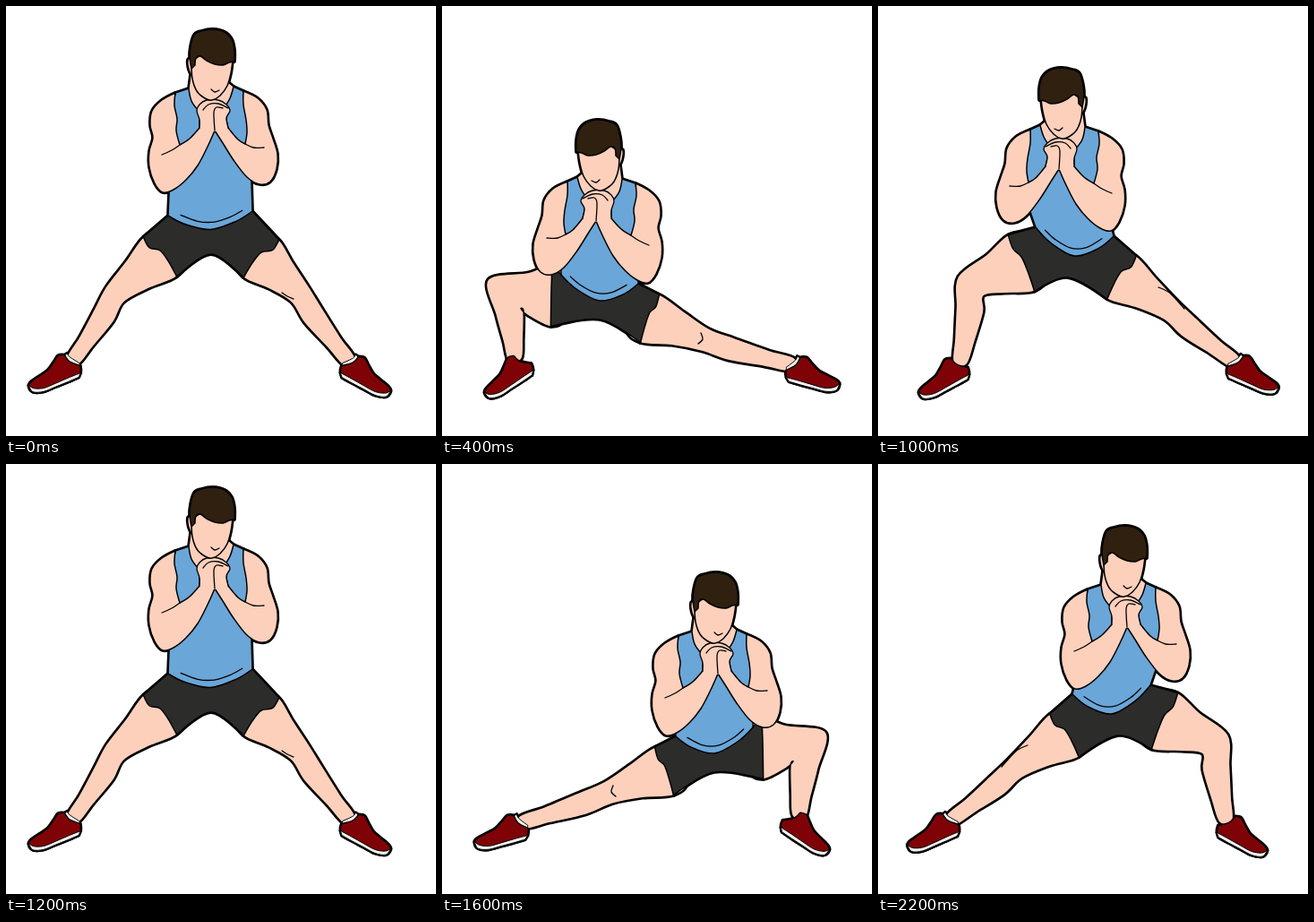
These frames come from a looping animation (480x480 px, 2.4 s). An HTML page:

```html
<!DOCTYPE html>
<html lang="en">
<head>
<meta charset="utf-8">
<title>Side lunge</title>
<style>
html, body { margin: 0; width: 100%; height: 100%; overflow: hidden; background: #fff; }
svg { display: block; width: 100%; height: 100%; }
path { stroke: #000; stroke-width: 1.5; stroke-linejoin: round; stroke-linecap: round; }
.edge { fill: #000; stroke-width: 3.8; }
.skin { fill: #fdd0bc; }
.bare { fill: #fdd0bc; stroke: none; }
.shirt { fill: #6aa6d8; }
.shorts { fill: #2c2c2a; }
.shoe { fill: #7f0306; }
.sole, .sock { fill: #f1efee; stroke-width: 1; }
.hair { fill: #2f2010; }
.line { fill: none; stroke-width: 1.3; }
</style>
</head>
<body>
<svg id="stage" viewBox="0 0 480 480"></svg>
<script>
// Joints of each pose; "wrist" is where the forearms meet. thick swells a loaded leg.
const stand = {
  wrist: [247, 139], waist: [[205, 229], [299, 234]], sag: 18, crotch: [251, 277],
  legs: [
    { hip: [195, 282], knee: [152, 322], ankle: [96, 397], tilt: 3 },
    { hip: [308, 280], knee: [358, 322], ankle: [406, 396], tilt: -3 }
  ],
  crease: '172,320 166,324 159,327'
};
const mid = {
  wrist: [202, 182], waist: [[176, 247], [263, 257]], sag: 27, crotch: [212, 303],
  legs: [
    { hip: [160, 287], knee: [104, 313], ankle: [91, 399], tilt: 3, thick: 1.2 },
    { hip: [272, 303], knee: [327, 340], ankle: [399, 397], tilt: -2 }
  ],
  crease: '313,314 324,319 335,330 342,338'
};
const low = {
  wrist: [172, 234], waist: [[133, 294], [219, 304]], sag: 24, crotch: [176, 344],
  legs: [
    { hip: [122, 317], knee: [70, 316], ankle: [81, 394], tilt: 8, thick: 1.2, slide: 9 },
    { hip: [232, 343], knee: [294, 367], ankle: [392, 400], tilt: -10 }
  ],
  crease: '289,359 291,366 286,371'
};

// The deepest squat: everything above the ankles sinks further.
const sink = ([x, y]) => [x, y + 2 + 6 * Math.min(1, Math.max(0, (400 - y) / 30))];
const deep = {
  ...low,
  wrist: sink(low.wrist), waist: low.waist.map(sink), crotch: sink(low.crotch),
  legs: low.legs.map(g => ({ ...g, hip: sink(g.hip), knee: sink(g.knee), ankle: sink(g.ankle) })),
  crease: '289,367 291,374 286,379'
};

// Half widths along a leg: [bone, place on it, outer, inner]
const girth = [
  [0, -0.3, 20, 20], [0, 0, 29, 29], [0, 0.5, 21, 19],
  [1, 0, 13.5, 13], [1, 0.3, 11, 15], [1, 0.7, 8, 11], [1, 1, 7, 8]
];

// Shapes below are relative to the ankle; "!" marks a sharp corner.
const foot = [
  ['sock', '-8,2! 3,-4 6,-8! 9,-4 3,2 -9,6!'],
  ['shoe', '-9,5! 3,1 9,-6! 16,-5 21,3 27,12 36,19 45,26 47,31 42,37 30,36 17,30 4,24 -8,18! -10,11'],
  ['sole', '-10,13! 3,19 17,26 30,32 41,33 47,30! 42,37 30,36 17,30 4,24 -8,18!']
];

// Relative to the wrist.
const bust = [
  ['skin', '-21,-49! -17,-36 -10,-25! 18,-22! 26,-33 29,-47! 27,-62! -15,-54!'],
  ['skin', '44,-42! 59,-34 70,-22 72,-6 69,8 73,23 73,41 67,59 58,69 46,66 32,55 19,39 8,18 0,0! 0,-24! 17,-24! 17,-3! 28,9 39,16! 43,0 42,-13 45,-28'],
  ['skin', '-32,-44! -48,-36 -58,-23 -60,-6 -65,9 -70,26 -69,43 -62,57 -50,60 -36,52 -21,33 -9,14 0,0! 0,-22! -16,-22! -13,-14 -15,-3! -26,10 -34,15! -36,2 -35,-12 -32,-29'],
  ['line', '-34,15 -43,19 -55,19'],
  ['line', '39,16 48,22 59,27'],
  ['bare', '-17,-22! -13,-29 -4,-34 9,-34 17,-29 20,-22 17,-12 17,-3! 0,1! -15,-3! -13,-14'],
  ['line', '-15,-3 -13,-14 -17,-22 -13,-29 -4,-34 9,-34 17,-29 20,-22 17,-12 17,-3'],
  ['line', '-15,-25 -4,-30 7,-29 13,-23'],
  ['line', '-9,-25 -2,-26 1,-20 0,0'],
  ['skin', '26,-80! 30,-79 29,-68 25,-60!'],
  ['skin', '-20,-79! -18,-64 -14,-50 -6,-39 3,-34 11,-36 20,-44 25,-58 26,-77! 4,-92!'],
  ['line', '-5,-45 0,-43 4,-46'],
  ['hair', '-22,-77! -22,-90 -19,-102 -11,-110 2,-113 15,-111 23,-107 27,-94 28,-82 26,-69! 22,-73! 21,-81 16,-83 9,-78 0,-74 -9,-73 -16,-76']
];

const mix = (a, b, t) => [a[0] + (b[0] - a[0]) * t, a[1] + (b[1] - a[1]) * t];
const sharp = ([x, y]) => [x, y, true];
const from = ([ox, oy]) => (x, y) => [x + ox, y + oy];

function read(text, place) {
  return text.split(' ').map(word => {
    const p = place(...word.split(',').map(parseFloat));
    return word.endsWith('!') ? sharp(p) : p;
  });
}

// Smooth path through points, with no handles at sharp ones.
function curve(pts, open) {
  const n = pts.length;
  const at = i => open ? pts[Math.min(n - 1, Math.max(0, i))] : pts[(i + n) % n];
  const handle = (i, sign) => {
    const p = at(i), a = at(i - 1), b = at(i + 1), k = p[2] ? 0 : sign / 6;
    return `${(p[0] + (b[0] - a[0]) * k).toFixed(1)} ${(p[1] + (b[1] - a[1]) * k).toFixed(1)}`;
  };
  let d = `M${pts[0][0]} ${pts[0][1]}`;
  for (let i = 0; i < (open ? n - 1 : n); i++) {
    const q = at(i + 1);
    d += `C${handle(i, 1)} ${handle(i + 1, -1)} ${q[0]} ${q[1]}`;
  }
  return open ? d : d + 'Z';
}

// Both edges of a leg, from hip to ankle.
function legEdges({ hip, knee, ankle, thick = 1 }, side) {
  const bones = [[hip, knee], [knee, ankle]];
  const normals = bones.map(([a, b]) => {
    const dx = b[0] - a[0], dy = b[1] - a[1], len = Math.hypot(dx, dy);
    return [side * dy / len, -side * dx / len];
  });
  const [u, v] = normals;
  const fold = 1 + u[0] * v[0] + u[1] * v[1];
  const miter = [(u[0] + v[0]) / fold, (u[1] + v[1]) / fold];
  const outer = [], inner = [];
  for (const [bone, t, out, back] of girth) {
    const c = mix(...bones[bone], t);
    const m = bone === 1 && t === 0 ? miter : normals[bone];
    const k = t === 1 ? 1 : thick;
    outer.push([c[0] + m[0] * out * k, c[1] + m[1] * out * k]);
    inner.push([c[0] - m[0] * back * k, c[1] - m[1] * back * k]);
  }
  return { outer, inner };
}

function footParts({ ankle, tilt, slide = 0, thick }, side) {
  const a = tilt * Math.PI / 180, cos = Math.cos(a), sin = Math.sin(a);
  const place = (x, y) => [ankle[0] + slide + side * (x * cos - y * sin), ankle[1] + x * sin + y * cos];
  return foot.filter(([kind]) => kind !== 'sock' || !thick)
    .map(([kind, text]) => [kind, read(text, place)]);
}

// Wavy hem across a thigh, outer to inner corner.
const hem = ({ outer, inner }) => {
  const wave = (t, dy) => { const p = mix(outer[1], inner[1], t); return [p[0], p[1] + dy]; };
  return [sharp(outer[1]), wave(0.18, 4), wave(0.5, -7), wave(0.75, -6), sharp(inner[1])];
};

function build(pose) {
  const [wl, wr] = pose.waist;
  const parts = [], edges = [];
  pose.legs.forEach((leg, i) => {
    const side = i ? 1 : -1, e = legEdges(leg, side);
    edges.push(e);
    parts.push(['skin', [...e.outer, ...e.inner.slice().reverse()]], ...footParts(leg, side));
  });
  parts.push(['line', read(pose.crease, (x, y) => [x, y])]);

  const [l, r] = edges;
  parts.push(['shorts', [sharp(wl), ...hem(l), pose.crotch, ...hem(r).reverse(), sharp(wr)]]);

  const belly = (t, lift) => {
    const p = mix(wr, wl, t);
    return [p[0], p[1] + pose.sag * Math.sin(Math.PI * t) - lift];
  };
  const at = from(pose.wrist);
  parts.push(['shirt', [
    ...read('-32,-44! -21,-49! 29,-47! 44,-42! 49,-10 49,20', at),
    sharp(wr), ...[0.2, 0.5, 0.8].map(t => belly(t, 0)), sharp(wl),
    ...read('-40,20 -40,-10', at)
  ]]);
  parts.push(['line', [0.15, 0.35, 0.55, 0.75, 0.88].map(t => belly(t, 8))]);
  for (const [kind, text] of bust) parts.push([kind, read(text, at)]);
  return parts;
}

function draw(pose) {
  let edge = '', body = '';
  for (const [kind, pts] of build(pose)) {
    const open = kind === 'line', d = curve(pts, open);
    if (!open) edge += `<path class="edge" d="${d}"/>`;
    body += `<path class="${kind}" d="${d}"/>`;
  }
  return edge + body;
}

const plain = 'translate(0 0)';
const flip = 'matrix(-1 0 0 1 480 0)';

// [start ms, pose, placement]
const steps = [
  [0, stand, flip],
  [200, mid, plain],
  [400, deep, 'translate(0 -2)'],
  [600, low, plain],
  [1000, mid, plain],
  [1200, stand, flip],
  [1400, mid, flip],
  [1600, low, flip],
  [1800, deep, flip],
  [2200, mid, flip]
];
const LOOP = 2400;

const stage = document.getElementById('stage');
stage.innerHTML = steps.map(([, pose, place]) =>
  `<g transform="${place}" display="none">${draw(pose)}</g>`).join('');
const groups = [...stage.children];
let shown = -1;

function show(t) {
  let now = steps.length - 1;
  while (steps[now][0] > t) now--;
  if (now === shown) return;
  groups.forEach((g, i) => g.setAttribute('display', i === now ? 'inline' : 'none'));
  shown = now;
}

const begin = performance.now();
function tick() {
  show((performance.now() - begin) % LOOP);
  requestAnimationFrame(tick);
}
tick();
</script>
</body>
</html>
```
